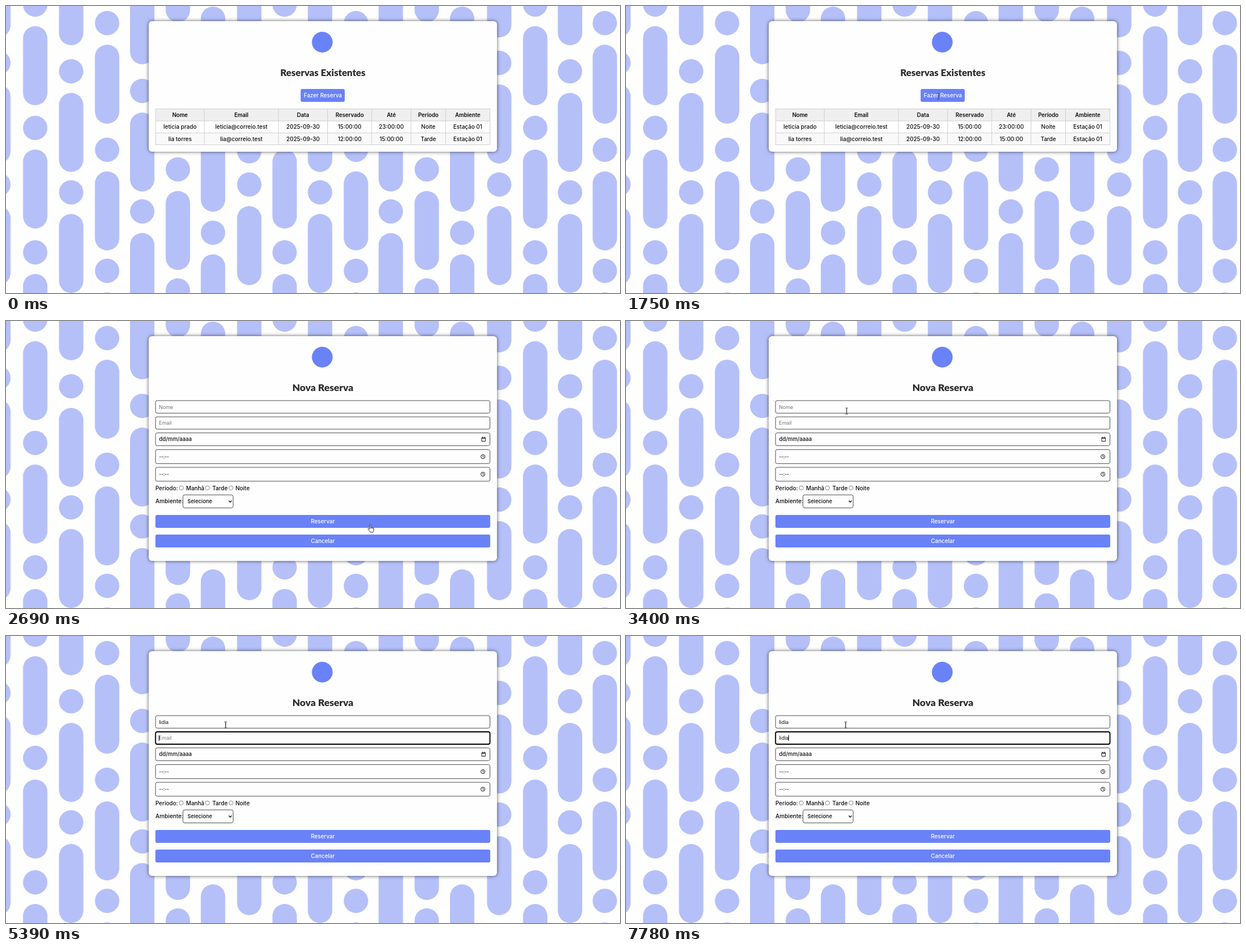
An HTML page for the animation above (8 s loop, 1093x512 px).

```html
<!DOCTYPE html>
<html lang="pt-BR">
<head>
<meta charset="utf-8">
<title>Reservas</title>
<style>
  html, body { margin: 0; width: 100%; height: 100%; overflow: hidden; background: #fefefe; }
  svg { position: absolute; left: 0; top: 0; display: block; }
  #card {
    position: absolute; left: 254px; top: 27px; width: 620px; height: 233px;
    border-radius: 6px; background: #fefefe; box-shadow: 0 0 6px rgba(0, 0, 0, .65);
  }
  text { font: 500 10px Inter, sans-serif; fill: #0c0c0c; white-space: pre; }
  .mid { text-anchor: middle; }
  .head { font-weight: 600; font-size: 9.7px; }
  .title { font: 900 17px Lato, sans-serif; fill: #2b2d2f; text-anchor: middle; }
  .small { font-weight: 400; font-size: 9px; }
  .hint { fill: #757575; }
  .accent { fill: #6a82f7; }
  .light { fill: #fff; }
  .field { fill: #fefefe; stroke: #4c4c4c; stroke-width: 1; }
  .field.on { stroke: #000; stroke-width: 1.9; }
  .grid { fill: none; stroke: #cfcfcf; }
  .icon { fill: none; stroke: #111; stroke-width: 1; }
  .radio { fill: #fff; stroke: #767676; stroke-width: .9; }
  .pointer { fill: #fff; stroke: #222; stroke-width: .9; stroke-linejoin: round; }
</style>
</head>
<body>
<svg id="backdrop" width="1093" height="512"></svg>
<div id="card"></div>
<svg width="1093" height="512">
  <circle class="accent" cx="563" cy="64.5" r="18.5"/>

  <g id="list">
    <text class="title" x="564" y="125">Reservas Existentes</text>
    <rect class="accent" x="524.5" y="148" width="78.5" height="23" rx="3"/>
    <text class="mid light" x="564" y="163">Fazer Reserva</text>
    <rect x="266" y="183" width="596" height="22" fill="#efeff0"/>
    <rect x="266" y="226" width="596" height="22" fill="#f9f9fa"/>
    <g id="table"></g>
  </g>

  <g id="form">
    <text class="title" x="564" y="125" style="font-size:17.6px">Nova Reserva</text>
    <g id="fields"></g>
    <text id="name" class="small" x="272.3" y="156.5"></text>
    <text id="email" class="small" x="272.3" y="185"></text>
    <rect id="caret" width="1" height="10" fill="#000"/>
    <text x="272.5" y="214.4" style="font-size:9.7px">dd/mm/aaaa</text>
    <text x="272.5" y="244.8" style="font-size:8.2px">--:--</text>
    <text x="272.5" y="276" style="font-size:8.2px">--:--</text>
    <path class="icon" d="M846.9 208.2h6.4v6.4h-6.4zM846.9 209.2h6.4M848.3 206.5v1.5M851.9 206.5v1.5"/>
    <g id="clock" class="icon"><circle cx="849" cy="242" r="3.6"/><path d="M849 239.6v2.6l1.7 1"/></g>
    <use href="#clock" y="31.3"/>
    <text x="266" y="301.7">Período:</text>
    <circle class="radio" cx="312" cy="297.8" r="3.7"/>
    <text x="320.5" y="301.7">Manhã</text>
    <circle class="radio" cx="358.5" cy="297.8" r="3.7"/>
    <text x="367.3" y="301.7">Tarde</text>
    <circle class="radio" cx="400.5" cy="297.8" r="3.7"/>
    <text x="408.5" y="301.7">Noite</text>
    <text x="266" y="325.4" style="font-size:10.2px">Ambiente:</text>
    <rect class="field" x="315" y="310.2" width="89.3" height="23.2" rx="3"/>
    <text x="323" y="325.2" style="font-size:9.4px">Selecione</text>
    <path class="icon" d="M396.6 320.6l2.5 2.6l2.5 -2.6" style="stroke-width:1.4"/>
    <rect class="accent" x="266" y="346" width="596" height="23" rx="3"/>
    <text class="mid light" x="564" y="361">Reservar</text>
    <rect class="accent" x="266" y="381" width="596" height="23" rx="3"/>
    <text class="mid light" x="564" y="396">Cancelar</text>
  </g>

  <g id="cursor">
    <path id="arrow" class="pointer" d="M0 0v11.5l2.7 -2.5l1.8 4l1.8 -.8l-1.8 -3.9h3.7z"/>
    <path id="hand" class="pointer" d="M-1.8 8V1.2q0 -1.2 1 -1.2t1 1.2V5q2 -.7 2.2 .5q1.6 -.3 1.8 .6q1.4 0 1.4 1.3V10q0 1.6 -1.2 3.8H-.8Q-1.6 11.6 -4.4 8.6q-.5 -1 .4 -1.4q1 -.2 2.2 1.3zM.2 5v2.4M2.4 5.5v2M4.2 6.1v1.6"/>
    <path id="beam" d="M-2.5 -5.3h1.7q.8 0 .8 .8v9.4q0 .8 -.8 .8h-1.7M2.5 -5.3h-1.7q-.8 0 -.8 .8v9.4q0 .8 .8 .8h1.7" fill="none" stroke="#333" stroke-width=".9"/>
  </g>
</svg>

<script>
const LOOP = 8000, FORM_AT = 1820, NAME_AT = 3610, EMAIL_AT = 5390;
const $ = id => document.getElementById(id);
const show = (el, on) => { el.style.display = on ? '' : 'none'; };

function add(parent, tag, attrs, text = '') {
  const el = document.createElementNS('http://www.w3.org/2000/svg', tag);
  for (const key in attrs) el.setAttribute(key, attrs[key]);
  el.textContent = text;
  return parent.appendChild(el);
}

// Backdrop: seven kinds of column, each repeating every 442 px downwards.
const columns = [-13.5, 52, 116, 180, 242.5, 306, 368.5, 433, 496, 559, 623, 685, 749, 812, 878, 942, 1004, 1066];
const pillTops = [[140, 357], [36, 256], [155, 371], [69, 295], [190, 405], [104, 330], [1, 226]];
columns.forEach((x, i) => {
  for (const top of pillTops[i % 7]) {
    for (const y of [top - 442, top, top + 442]) {
      add($('backdrop'), 'circle', { cx: x, cy: y - 38.5, r: 21.7, fill: '#b5c0f9' });
      add($('backdrop'), 'rect', { x: x - 21.7, y, width: 43.4, height: 141, rx: 21.7, fill: '#b5c0f9' });
    }
  }
});

// Table
const edges = [266.5, 353, 485, 572.5, 651, 721, 782.5, 861.5];
const rows = [
  ['Nome', 'Email', 'Data', 'Reservado', 'Até', 'Período', 'Ambiente'],
  ['leticia prado', 'leticia@correio.test', '2025-09-30', '15:00:00', '23:00:00', 'Noite', 'Estação 01'],
  ['lia torres', 'lia@correio.test', '2025-09-30', '12:00:00', '15:00:00', 'Tarde', 'Estação 01']
];
const lines = [183.5, 205, 226.5, 247.5].map(y => `M266 ${y}H862`).concat(edges.map(x => `M${x} 183V248`));
add($('table'), 'path', { class: 'grid', d: lines.join('') });
rows.forEach((row, r) => row.forEach((cell, c) => add($('table'), 'text', {
  class: r ? 'mid' : 'mid head', x: (edges[c] + edges[c + 1]) / 2, y: 197.7 + r * 21.5
}, cell)));

// Form fields
const fields = [[142, 22.4], [171, 22], [199.6, 22.8], [229.4, 25], [261, 24.8]].map(([y, height]) =>
  add($('fields'), 'rect', { class: 'field', x: 266.2, y, width: 595.3, height, rx: 3 }));

const word = 'lidia';
const nameKeys = [4330, 4460, 4660, 4860, 4930];
const emailKeys = [6980, 7120, 7450, 7650, 7780];
const typed = (keys, t) => word.slice(0, keys.filter(k => t >= k).length);

function fill(el, value, hint) {
  const text = value || hint;
  if (el.textContent !== text) el.textContent = text;
  el.classList.toggle('hint', !value);
}

function caretOn(t) {
  if (t < EMAIL_AT) return t >= NAME_AT && (t < 4130 || t >= nameKeys[0]);
  return t < 5920 || (t >= 6450 && t < 6580) || t >= emailKeys[0];
}

// Pointer path: time, x, y, shape
const path = [
  [530, 945, 436, 'arrow'], [700, 820, 420, 'arrow'], [860, 600, 380, 'arrow'],
  [1000, 393, 300, 'arrow'], [1130, 420, 240, 'arrow'], [1270, 548, 166, 'hand'],
  [1340, 556, 161, 'hand'], [1749, 556, 161, 'hand'], [1750, 556, 161, 'beam'],
  [2200, 556, 161, 'beam'], [2270, 562, 170, 'beam'], [2410, 608, 240, 'arrow'],
  [2550, 668, 325, 'arrow'], [2620, 670, 352, 'hand'], [2690, 649, 363, 'hand'],
  [2760, 640, 335, 'arrow'], [2900, 540, 250, 'beam'], [3050, 419, 178, 'beam'],
  [3120, 412, 173, 'beam'], [3400, 392, 160, 'beam'], [3540, 391, 158.5, 'beam'],
  [LOOP, 391, 158.5, 'beam']
];
const legs = [530, 1750, 2270], STEP = 70;

function drawCursor(t) {
  show($('cursor'), t >= legs[0]);
  if (t < legs[0]) return;
  const start = legs.filter(l => l <= t).pop();
  const q = start + Math.floor((t - start) / STEP) * STEP;
  const i = path.findIndex(p => p[0] > q);
  const [t0, x0, y0, shape] = path[i - 1], [t1, x1, y1] = path[i];
  const k = (q - t0) / (t1 - t0);
  $('cursor').setAttribute('transform', `translate(${x0 + (x1 - x0) * k} ${y0 + (y1 - y0) * k})`);
  $('cursor').setAttribute('opacity', t >= 1750 && t < FORM_AT ? .5 : 1);
  for (const id of ['arrow', 'hand', 'beam']) show($(id), id === shape);
}

function draw(t) {
  const form = t >= FORM_AT, onEmail = t >= EMAIL_AT;
  show($('list'), !form);
  show($('form'), form);
  $('card').style.height = (form ? 401 : 233) + 'px';
  if (form) {
    const name = typed(nameKeys, t), email = typed(emailKeys, t);
    fill($('name'), name, 'Nome');
    fill($('email'), email, 'Email');
    fields[0].classList.toggle('on', t >= NAME_AT && !onEmail);
    fields[1].classList.toggle('on', onEmail);
    const value = onEmail ? email : name;
    const width = value ? $(onEmail ? 'email' : 'name').getComputedTextLength() : 0;
    $('caret').setAttribute('x', Math.round(272 + width));
    $('caret').setAttribute('y', onEmail ? 177 : 148);
    show($('caret'), caretOn(t));
  }
  drawCursor(t);
}

const begin = performance.now();
function tick() {
  draw((performance.now() - begin) % LOOP);
  requestAnimationFrame(tick);
}
tick();
</script>
</body>
</html>
```
